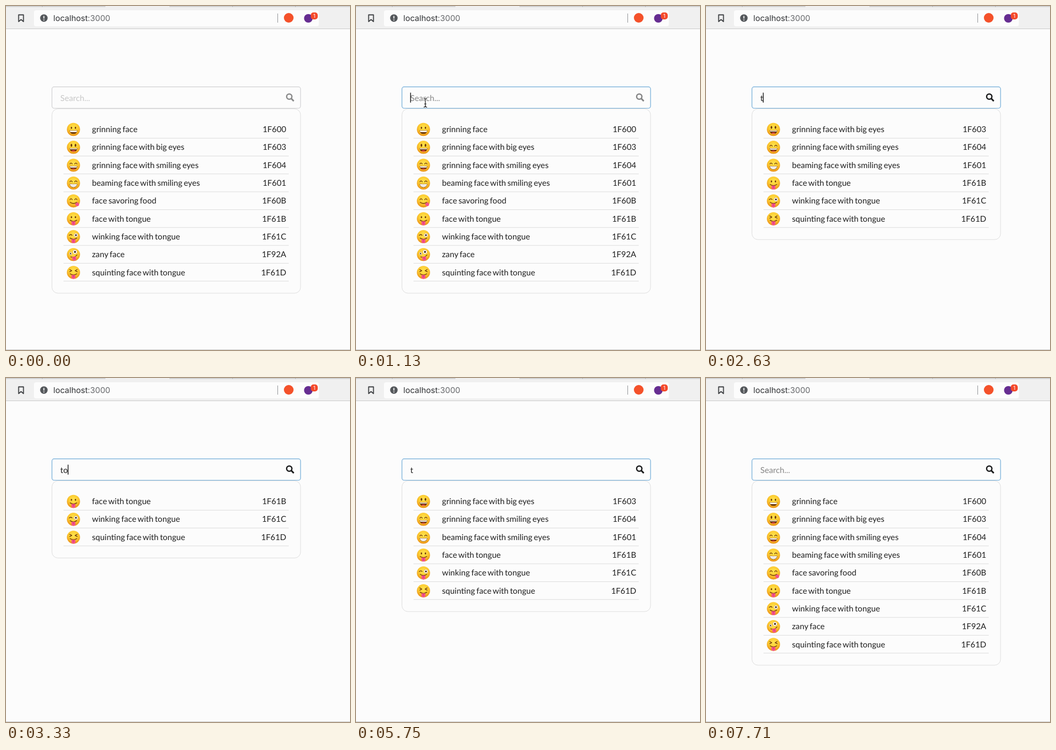
Animation of 640 by 641 pixels, one loop 7.75 s. Source, as an HTML page:

```html
<!DOCTYPE html>
<html lang="en">
<head>
<meta charset="utf-8">
<title>Emoji search</title>
<style>
  html, body { margin: 0; width: 100%; height: 100%; overflow: hidden; background: #fcfcfc; }
  svg { display: block; width: 640px; height: 641px; }
  text { font: 15.2px Lato, sans-serif; fill: #1f1f1f; word-spacing: -.08em; text-rendering: geometricPrecision; }
  .url { font: 15px Inter, sans-serif; fill: #67696c; }
  .url tspan { fill: #303235; }
  .badge { font: 10px Inter, sans-serif; fill: #fff; text-anchor: middle; }
  .code { text-anchor: end; }
  .line { fill: none; stroke: #6b370c; stroke-width: 1.3; stroke-linecap: round; stroke-linejoin: round; }
  .dark { fill: #6b370c; }
  .tongue { fill: #f4538a; }
</style>
</head>
<body>
<svg viewBox="0 0 640 641">
  <defs>
    <radialGradient id="skin" cx=".5" cy=".36" r=".66">
      <stop offset="0" stop-color="#ffe44f"/>
      <stop offset=".55" stop-color="#fcca30"/>
      <stop offset="1" stop-color="#e88a14"/>
    </radialGradient>
    <path id="bar" d="M-3.2 -8Q0 -8 0 -5.5V6Q0 8.5 -3.2 8.5M3.2 -8Q0 -8 0 -5.5V6Q0 8.5 3.2 8.5M-2 2.5H2"/>
  </defs>

  <rect width="640" height="641" fill="#fcfcfc"/>
  <rect width="640" height="42" fill="#f0f0f0"/>
  <path d="M0 0H185V2H0ZM304 0H640V2H304Z" fill="#d2d3d4"/>
  <path d="M67.5 0V2M421.5 0V2M538.5 0V2" stroke="#b0b1b3"/>
  <path d="M0 42.5H640" stroke="#cacaca"/>
  <path d="M0 640.5H640" stroke="#c9c9c9"/>
  <rect x="52" y="8" width="530" height="30" rx="4" fill="#fcfcfc"/>
  <path d="M23.5 16.5H32.5V29L28 25.2L23.5 29Z" fill="none" stroke="#3d3f42" stroke-width="1.8" stroke-linejoin="round"/>
  <circle cx="70.5" cy="22.5" r="7" fill="#55585c"/>
  <path d="M70.5 18.6V23.4M70.5 25.2V27" stroke="#fff" stroke-width="1.8"/>
  <text class="url" x="88" y="28"><tspan>localhost</tspan>:3000</text>
  <path d="M505.5 14V31" stroke="#929497"/>
  <circle cx="526" cy="22" r="9" fill="#f4512a"/>
  <circle cx="562.5" cy="23" r="8" fill="#662d91"/>
  <rect x="567" y="12" width="13" height="13" rx="5" fill="#f4492a"/>
  <text class="badge" x="573.5" y="22">1</text>

  <rect id="panel" x="85.5" y="191.7" width="462.5" rx="11" fill="#fcfcfc" stroke="#dedede"/>
  <g id="list"></g>
  <rect id="field" x="85.5" y="150.7" width="462.5" height="39.8" rx="4" fill="#fcfcfc" stroke-width="1.2"/>
  <text id="query" x="101" y="176.5"></text>
  <path id="caret" d="M0 161.5V180" stroke="#111" stroke-width="1.4"/>
  <g id="lens" fill="none" stroke="#1b1c1d" stroke-width="2.5">
    <circle cx="527" cy="168.8" r="4.9"/>
    <path d="M530.6 172.4L535.4 177.2" stroke-width="3"/>
  </g>

  <path id="arrow" d="M0 0V15.6L3.6 12.2L6 17.8L8.8 16.6L6.4 11.2H11.2Z" stroke="#fff" stroke-width="1.1" stroke-linejoin="round"/>
  <g id="beam" fill="none">
    <use href="#bar" stroke="#fff" stroke-width="2.6"/>
    <use href="#bar" stroke="#111" stroke-width="1.2"/>
  </g>
</svg>
<script>
const LOOP = 7750, FOCUS = 1090, PITCH = 33.3;
const $ = id => document.getElementById(id);

// Face parts, centred on 0,0 with a radius of 12
const path = (cls, d) => `<path class="${cls}" d="${d}"/>`;
const oval = (x, y, rx, ry, fill = '#6b370c') =>
  `<ellipse cx="${x}" cy="${y}" rx="${rx}" ry="${ry}" fill="${fill}"/>`;
const dots = (rx, ry, y = -3) => oval(-3.7, y, rx, ry) + oval(3.7, y, rx, ry);
const arcs = path('line', 'M-6.6 -2.2Q-4.4 -5.8 -2.2 -2.2M2.2 -2.2Q4.4 -5.8 6.6 -2.2');
const grin = path('dark', 'M-7.2 1.4Q0 2.2 7.2 1.4Q6.6 8.2 0 8.2Q-6.6 8.2 -7.2 1.4Z');
const teeth = h => `<path fill="#fff" d="M-6.6 1.9Q0 2.6 6.6 1.9L${6.6 - h / 4} ${1.9 + h}H${h / 4 - 6.6}Z"/>`;
const smile = path('line', 'M-6.2 2.6Q0 7 6.2 2.6');
const tongue = path('tongue', 'M-3.6 4.8H3.6V8.6Q3.6 12.2 0 12.2Q-3.6 12.2 -3.6 8.6Z') +
  '<path d="M0 5.5V9" stroke="#cf2f68" stroke-width=".8"/>';
const bigEye = (x, y, r) => oval(x, y, r, r, '#fff') +
  `<circle cx="${x}" cy="${y}" r="${r}" fill="none" stroke="#c7811b" stroke-width=".5"/>` +
  oval(x, y, r * .46, r * .46, '#3a2415');

const EMOJI = [
  ['grinning face', '1F600', dots(1.3, 1.9) + grin + teeth(3.2)],
  ['grinning face with big eyes', '1F603', dots(1.5, 2.8, -3.8) + grin + teeth(1.8) + oval(0, 6.9, 3.2, 1.1, '#ee4a55')],
  ['grinning face with smiling eyes', '1F604', arcs + grin + teeth(2.6) + oval(0, 7.1, 3, .9, '#ee4a55')],
  ['beaming face with smiling eyes', '1F601', arcs + grin +
    '<path fill="#fff" d="M-6.6 1.9Q0 2.7 6.6 1.9Q6 7.6 0 7.6Q-6 7.6 -6.6 1.9Z"/>' +
    '<path d="M-6 4.8H6" stroke="#b9a792" stroke-width=".6"/>'],
  ['face savoring food', '1F60B', arcs + smile +
    path('tongue', 'M2.6 5.2Q5.6 4.8 7 2.4Q11.4 4.4 10.4 7.8Q8.8 11 5.6 9.4Q3.2 8 2.6 5.2Z')],
  ['face with tongue', '1F61B', dots(1.3, 1.8) + smile + tongue],
  ['winking face with tongue', '1F61C', path('line', 'M-7.8 -2.4Q-5.2 -5.2 -2.4 -2.6') +
    bigEye(4.6, -2.8, 3.6) + smile + tongue],
  ['zany face', '1F92A', `<g transform="rotate(-18)">${bigEye(-4.6, -3.4, 2.7) + bigEye(4.2, -3.8, 3.9) + smile}</g>` +
    `<g transform="rotate(-12) translate(0 -.8)">${tongue}</g>`],
  ['squinting face with tongue', '1F61D',
    path('line', 'M-7 -5.4L-3 -3.2L-7 -1.2M7 -5.4L3 -3.2L7 -1.2') + smile + tongue],
];

const rows = EMOJI.map(([name, code, face]) => {
  const g = document.createElementNS('http://www.w3.org/2000/svg', 'g');
  g.innerHTML = `<g transform="translate(125.5 230)"><circle r="12.2" fill="url(#skin)"/>${face}</g>
    <text x="160" y="235.2">${name}</text>
    <text class="code" x="521.3" y="235.2">${code}</text>
    <path d="M107 246.3H526" stroke="#dcdcdc"/>`;
  return $('list').appendChild(g);
});

// Query text from each time on
const TYPED = [[0, ''], [2200, 't'], [2920, 'to'], [3400, 'ton'], [3920, 'tong'],
  [4750, 'ton'], [5080, 'to'], [5420, 't'], [6020, '']];
const BLINK = [[FOCUS, 1], [1590, 0], [2090, 1], [2700, 0], [2920, 1], [4420, 0],
  [4920, 1], [5420, 0], [5920, 1], [6420, 0], [6920, 1], [7420, 0]];
// Pointer: time, x, y
const ENTER = [[40, 122, 527], [400, 124, 400], [800, 127, 215], [1000, 129, 180], [2200, 129, 180]];
const LEAVE = [[6480, 129, 180], [6670, 75, 270], [6900, -16, 345]];

const at = (steps, t, first) => steps.reduce((v, s) => t >= s[0] ? s[1] : v, first);

function follow(track, t) {
  const i = track.findIndex(p => p[0] > t);
  if (i < 1) return null;
  const [a, b] = [track[i - 1], track[i]];
  const k = (t - a[0]) / (b[0] - a[0]);
  return [1, 2].map(n => a[n] + (b[n] - a[n]) * k);
}

const show = (el, on) => el.style.display = on ? '' : 'none';
let shown = null;

function filter(word) {
  if (word === shown) return;
  shown = word;
  let n = 0;
  rows.forEach((row, i) => {
    const hit = EMOJI[i][0].includes(word);
    show(row, hit);
    if (hit) row.setAttribute('transform', `translate(0 ${PITCH * n++})`);
  });
  $('panel').setAttribute('height', 43.7 + PITCH * n);
  $('query').textContent = word || 'Search...';
  const width = word ? $('query').getComputedTextLength() : 0;
  $('caret').setAttribute('transform', `translate(${Math.floor(101 + width) + .5} 0)`);
}

function draw(t) {
  const word = at(TYPED, t, ''), focused = t >= FOCUS;
  filter(word);
  $('query').style.fill = word ? '#1f1f1f' : focused ? '#858585' : '#c7c7c7';
  $('field').setAttribute('stroke', focused ? '#6fabd8' : '#d0d0d2');
  const k = Math.min(1, Math.max(0, (t - FOCUS) / 300));
  $('lens').setAttribute('opacity', .5 + .5 * k * k * (3 - 2 * k));
  show($('caret'), at(BLINK, t, 0));

  const pos = follow(ENTER, t) || follow(LEAVE, t);
  const inside = pos && pos[0] > 85 && pos[1] > 150 && pos[1] < 191;
  show($('arrow'), pos && !inside);
  show($('beam'), inside);
  if (pos) $(inside ? 'beam' : 'arrow').setAttribute('transform', `translate(${pos})`);
}

const start = performance.now();
function tick() {
  draw((performance.now() - start) % LOOP);
  requestAnimationFrame(tick);
}
tick();
</script>
</body>
</html>
```
